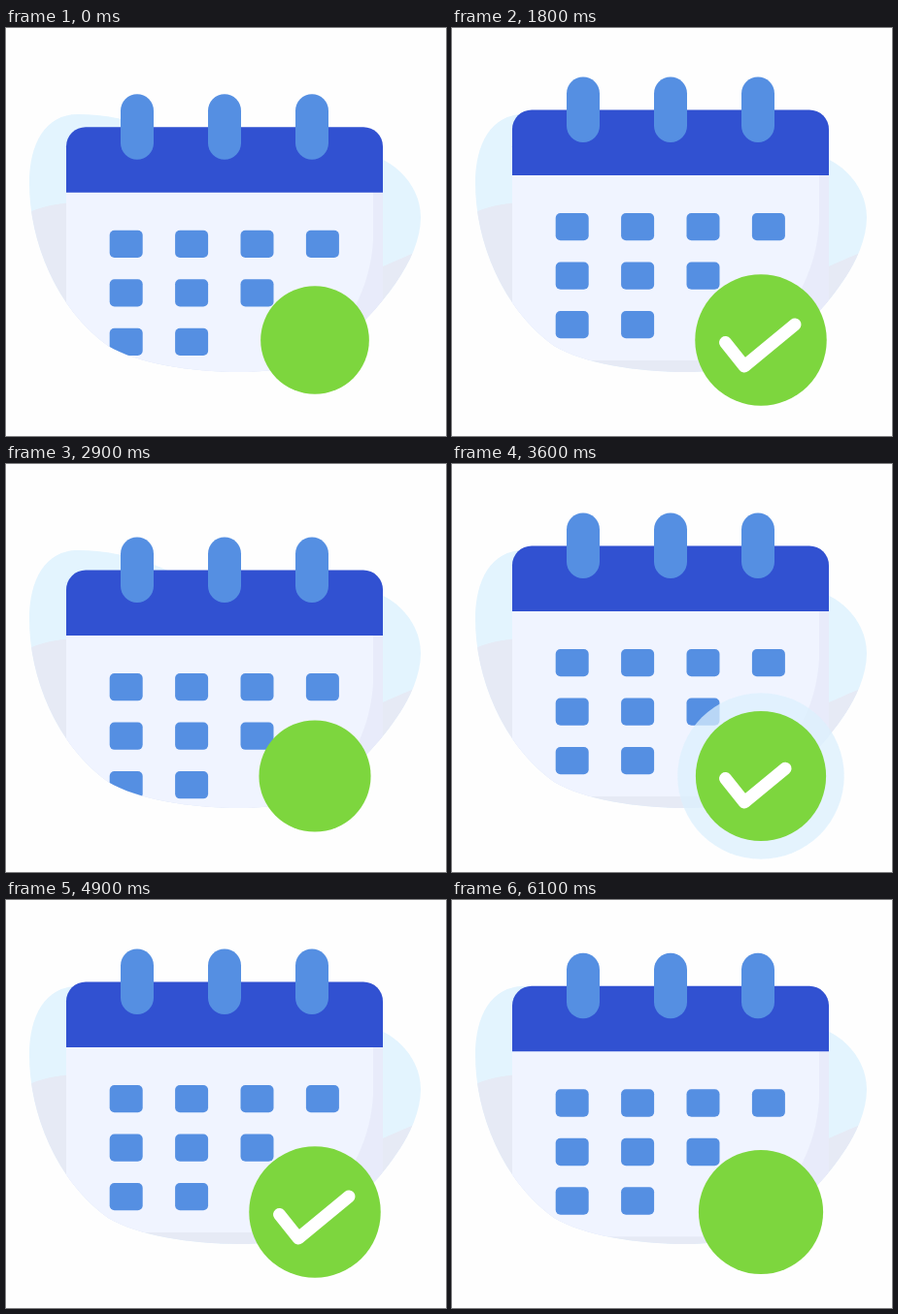
These frames come from a looping animation (453x421 px, 6200 ms). An HTML page:

```html
<!DOCTYPE html>
<html lang="en">
<head>
<meta charset="utf-8">
<title>Calendar check</title>
<style>
  html, body { margin: 0; width: 100%; height: 100%; overflow: hidden; background: #fefefe; }
  svg { display: block; width: 100vw; height: 100vh; }
</style>
</head>
<body>
<svg viewBox="0 0 453 421" preserveAspectRatio="none">
  <defs>
    <path id="blob" d="M24 160C24 220 52 290 105 328C135 346 190 355 240 355C285 355 318 346 342 328C385 290 427 240 427 195C427 160 395 128 355 128C325 128 305 138 275 138C235 138 195 123 160 107C130 94 100 89 74 89C40 89 24 120 24 160Z"/>
    <clipPath id="inBlob"><use href="#blob"/></clipPath>
    <!-- lower edge of the blob, open at the top -->
    <clipPath id="pocket">
      <path d="M24 0V160C24 220 52 290 105 328C135 346 190 355 240 355C285 355 318 346 342 328C385 290 427 240 427 195V0Z"/>
    </clipPath>
  </defs>

  <use href="#blob" fill="#e3f4fe"/>
  <path clip-path="url(#inBlob)" fill="#e6eaf5"
    d="M20 192C40 182 60 180 80 180C130 180 170 202 210 232C240 255 262 274 292 274C335 274 375 250 430 228V370H20Z"/>

  <g clip-path="url(#pocket)">
    <g id="calendar">
      <path d="M62 150H388V343H62Z" fill="#e8ebfa"/>
      <path d="M62 150H378V200C376 250 350 300 300 343H62Z" fill="#f0f4ff"/>
      <path d="M62 152V104.500A20 20 0 0 1 82 84.500H368A20 20 0 0 1 388 104.500V152Z" fill="#3151d1"/>
      <g id="parts" fill="#558fe2"></g>
    </g>
  </g>

  <circle id="ring" cx="318" cy="322" fill="#dcf0fe"/>
  <circle id="disc" cx="318" cy="322" fill="#7dd63e"/>
  <path id="check" d="M281.500 324.500L301 349L353 306" pathLength="1" fill="none" stroke="#fff"
    stroke-width="13" stroke-linecap="round" stroke-linejoin="round"/>
</svg>
<script>
  const LOOP = 6200, STEP = 100, DISC = 67.75, DROP = 325;
  const $ = id => document.getElementById(id);
  const clamp = x => Math.min(1, Math.max(0, x));
  const span = (t, start, length) => clamp((t - start) / length);

  function addRect(x, y, width, height, rx) {
    const rect = document.createElementNS("http://www.w3.org/2000/svg", "rect");
    Object.entries({ x, y, width, height, rx }).forEach(([k, v]) => rect.setAttribute(k, v));
    $("parts").append(rect);
  }

  for (let i = 0; i < 3; i++) addRect(118 + 90 * i, 50.5, 34, 67.5, 17);
  for (let row = 0; row < 3; row++)
    for (let col = 0; col < 4 - row; col++)
      addRect(106.7 + 67.4 * col, 191 + 50.5 * row, 34, 28.3, 5);

  function bounce(x) {
    const k = 7.5625, n = 2.75;
    if (x < 1 / n) return k * x * x;
    if (x < 2 / n) return k * (x - 1.5 / n) ** 2 + 0.75;
    if (x < 2.5 / n) return k * (x - 2.25 / n) ** 2 + 0.9375;
    return k * (x - 2.625 / n) ** 2 + 0.984375;
  }

  // Two plays per loop; the first one is already under way at time zero.
  function playTime(t) {
    if (t < 2200) return t + 800;
    return t < 5400 ? t - 2220 : t - 5400;
  }

  function draw(now) {
    const t = playTime(Math.floor((now % LOOP) / STEP) * STEP);

    const y = DROP * (1 - bounce(span(t, 138, 778)));
    $("calendar").setAttribute("transform", `translate(0 ${y.toFixed(2)})`);

    $("disc").setAttribute("r", DISC * bounce(span(t, 318, 1080)));

    const pulse = span(t, 1251, 490);
    $("ring").setAttribute("r", pulse > 0 ? DISC + 30 * (1 - (1 - pulse) ** 3) : 0);
    $("ring").setAttribute("opacity", 1 - pulse);

    const drawn = span(t, 1000, 437);
    $("check").setAttribute("stroke-dasharray", drawn < 1 ? `${drawn} 2` : "none");
    $("check").setAttribute("visibility", drawn > 0 ? "visible" : "hidden");
  }

  const begin = performance.now();
  function frame() {
    draw(performance.now() - begin);
    requestAnimationFrame(frame);
  }
  frame();
</script>
</body>
</html>
```
